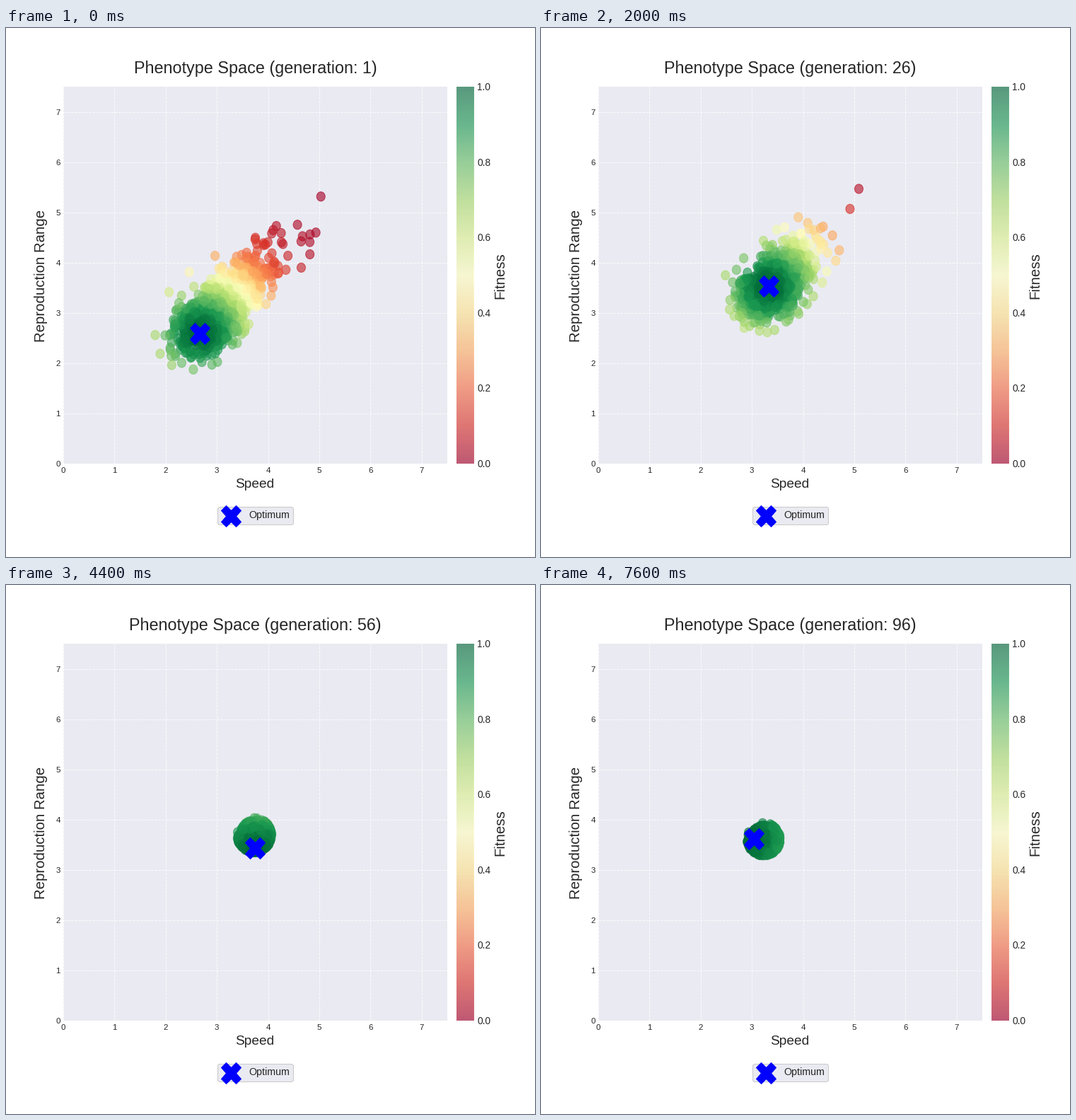
These frames come from a looping animation (748x748 px, 8 s). A matplotlib script:

```python
import numpy as np
import matplotlib.pyplot as plt
from matplotlib.animation import FuncAnimation
from matplotlib.lines import Line2D
from matplotlib.markers import MarkerStyle
from matplotlib.patches import FancyBboxPatch, Rectangle
from matplotlib.transforms import Affine2D

SIZE, DPI = 748, 100
FRAMES, INTERVAL = 20, 400
LEFT, RIGHT, TOP, BOTTOM = 81, 624, 83, 616
LIMIT = 7.5
PANEL, INK = "#eaeaf2", "#262626"
ALPHA = 0.62
BELL = 1.02       # width of the fitness bell
CROSSWISE = 0.26  # cloud width across the diagonal
COMPACT = 9       # first frame with a compact population
PT = 72 / DPI

plt.rcParams["font.family"] = "Liberation Sans"

# frame, optimum x and y, population centre x and y, population size
KEYS = np.array([
    (0, 2.67, 2.59, 3.04, 3.08, .66),
    (3, 3.48, 3.67, 3.48, 3.63, .46),
    (7, 3.18, 3.39, 3.35, 3.55, .48),
    (9, 3.27, 3.62, 3.29, 3.58, .48),
    (11, 3.74, 3.43, 3.73, 3.69, .34),
    (13, 3.40, 3.35, 3.12, 3.45, .34),
    (15, 3.37, 3.49, 2.96, 3.21, .40),
    (19, 3.04, 3.61, 3.23, 3.61, .325),
])


def cloud(rng, count, centre, spread):
    """Points strung along the diagonal, with a long tail to the upper right."""
    tail = (rng.gamma(4, size=count) - 4) / 2
    along = spread * (0.9 * tail + 0.45 * rng.normal(size=count))
    across = CROSSWISE * rng.normal(size=count)
    return centre + np.column_stack([along - across, along + across]) / np.sqrt(2)


def disc(rng, count, centre, radius):
    """Even disc whose rim is thinned out towards the upper left."""
    r = np.sqrt(rng.random(count))
    a = 2 * np.pi * rng.random(count)
    rim = (r > 0.82) & (np.cos(a - 2.1) > 0.5)
    keep = ~rim | (rng.random(count) < 0.06)
    ring = np.column_stack([np.cos(a), np.sin(a)]) * r[:, None]
    return centre + radius * ring[keep]


def state(k):
    """Optimum and population of one frame."""
    ox, oy, cx, cy, size = (np.interp(k, KEYS[:, 0], col) for col in KEYS.T[1:])
    count = int(np.interp(k, [0, 3, 7], [800, 160, 1300]))
    shape = cloud if k < COMPACT else disc
    rng = np.random.default_rng(100 + k)
    return np.array([ox, oy]), shape(rng, count, np.array([cx, cy]), size)


def narrow(shape):
    return MarkerStyle(shape, transform=Affine2D().scale(0.91, 1))


fig = plt.figure(figsize=(SIZE / DPI, SIZE / DPI), dpi=DPI, facecolor="white")

# Page in pixels, y down, for everything around the plot
page = fig.add_axes([0, 0, 1, 1])
page.axis("off")


def label(x, y, text, px, **kw):
    kw = {"ha": "center", "va": "baseline", "color": INK, **kw}
    return page.text(x, y, text, fontsize=px * PT,
                     rotation_mode="anchor", **kw)


page.add_patch(Rectangle((637, TOP), 24.5, BOTTOM - TOP, fc=PANEL, lw=0))
page.imshow(np.linspace(1, 0, 256)[:, None], cmap="RdYlGn", vmin=0, vmax=1,
            alpha=ALPHA, extent=(637, 661.5, BOTTOM, TOP), aspect="auto",
            interpolation="nearest", zorder=2)
page.set(xlim=(0, SIZE), ylim=(SIZE, 0))

for i in range(6):
    y = BOTTOM - i * (BOTTOM - TOP) / 5
    label(666.5, y + 5, f"{i / 5:.1f}", 13.8, ha="left")
for i in range(8):
    step = i / LIMIT
    label(LEFT + step * (RIGHT - LEFT), 629, str(i), 11.5)
    label(77, BOTTOM - step * (BOTTOM - TOP) + 4, str(i), 11.5, ha="right")

label(352, 650, "Speed", 19.2)
label(55, 350.5, "Reproduction Range", 20.4, rotation=90)
label(704.5, 350.5, "Fitness", 20.4, rotation=90)
title = label(352.5, 64, "", 23.4)

cross = dict(marker=narrow("X"), ms=22.1, mfc="blue", mec="blue",
             mew=0.72, ls="none")
page.add_patch(FancyBboxPatch((299.5, 677.5), 107, 25, fc=PANEL, ec="#cccccc",
                              lw=0.8, boxstyle="round,pad=0,rounding_size=3"))
page.add_line(Line2D([318.5], [690], **cross))
label(343.5, 693, "Optimum", 14.2, ha="left")

ax = fig.add_axes([LEFT / SIZE, 1 - BOTTOM / SIZE,
                   (RIGHT - LEFT) / SIZE, (BOTTOM - TOP) / SIZE],
                  facecolor=PANEL)
ax.set(xlim=(0, LIMIT), ylim=(0, LIMIT), xticks=range(8), yticks=range(8))
ax.tick_params(length=0, labelbottom=False, labelleft=False)
ax.spines[:].set_visible(False)
ax.set_axisbelow(True)
ax.grid(color="white", ls="--", lw=0.7, alpha=0.8)

dots = ax.scatter([0], [0], c=[0], s=9.5 ** 2, marker=narrow("o"),
                  cmap="RdYlGn", vmin=0, vmax=1, alpha=ALPHA,
                  linewidths=0.8, edgecolors="face", zorder=3)
best, = ax.plot([], [], zorder=4, **cross)


def draw(k):
    goal, points = state(k)
    dist2 = ((points - goal) ** 2).sum(axis=1)
    dots.set_offsets(points)
    dots.set_array(np.exp(-dist2 / (2 * BELL ** 2)))
    best.set_data([goal[0]], [goal[1]])
    title.set_text(f"Phenotype Space (generation: {5 * k + 1})")
    return dots, best, title


anim = FuncAnimation(fig, draw, frames=FRAMES, interval=INTERVAL,
                     repeat=True, repeat_delay=0)
plt.show()
```
